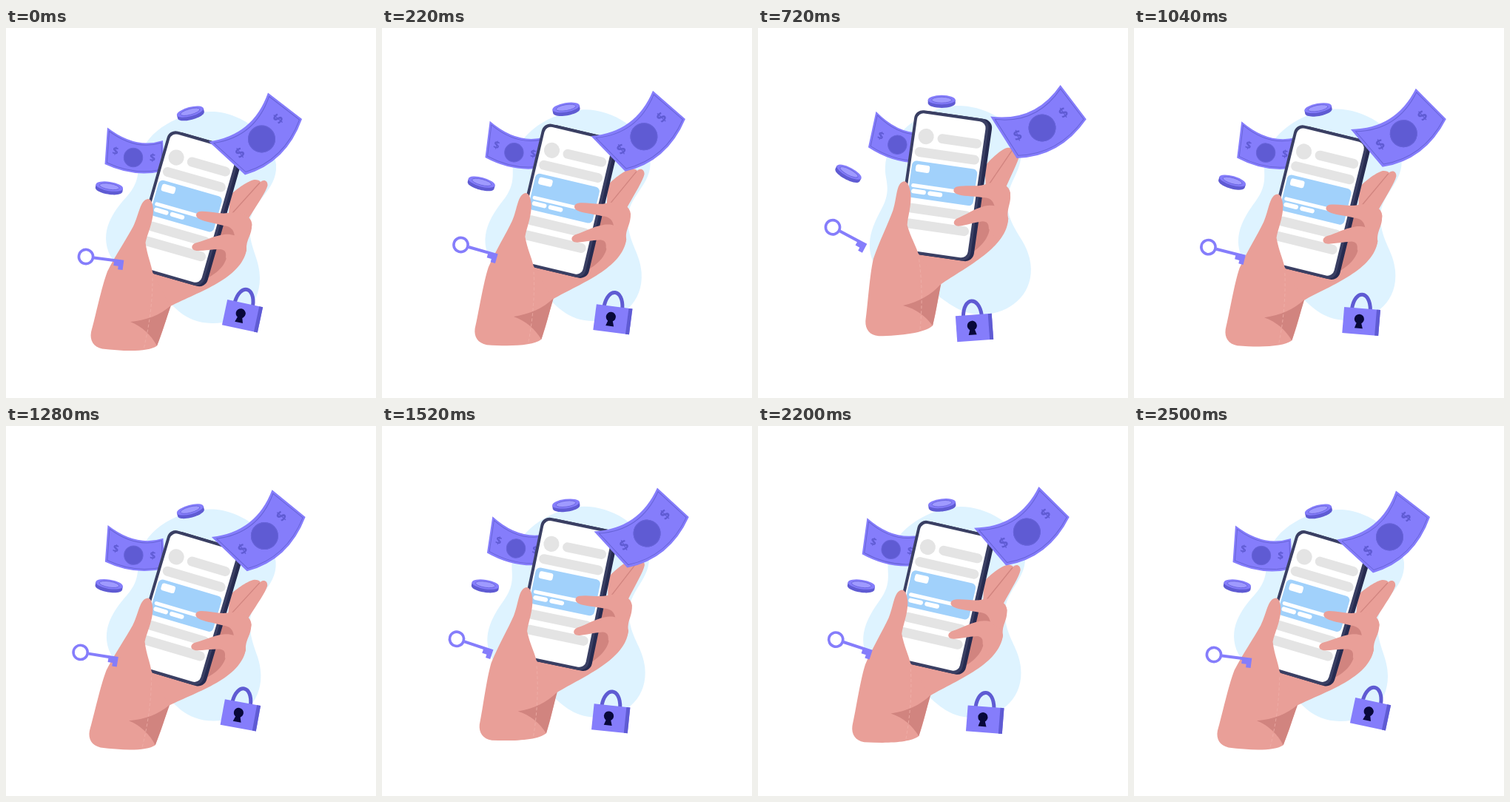
Recreate the animation shown at these times as an HTML page. Size 500 by 500 pixels, loop 2520 ms.

```html
<!DOCTYPE html>
<html lang="en">
<head>
<meta charset="utf-8">
<title>Mobile payment</title>
<style>
  html, body { margin: 0; width: 100%; height: 100%; overflow: hidden; background: #fff; }
  svg { display: block; width: 100%; height: 100%; }
  text { font: bold 19px "Open Sans", Arial, sans-serif; text-anchor: middle; fill: #5f5bd3; }
  .skin { fill: #e99f98; }
  .shade { fill: #d1847f; }
  .violet { fill: #857dfb; }
  .deep { fill: #5f5bd3; }
  .grey { fill: #e4e4e4; }
  .white { fill: #fff; }
  .line { fill: none; stroke: #6763d9; stroke-width: 1; }
</style>
</head>
<body>
<svg viewBox="0 0 500 500">
  <defs>
    <g id="disc">
      <path class="deep" d="M-18.5 -2V2.5C-18 11 18 11 18.5 2.5V-2Z"/>
      <ellipse class="violet" cy="-2" rx="18.5" ry="6.2"/>
      <ellipse cy="-1.8" rx="13.5" ry="4" fill="#9f9aff" stroke="#6a65de" stroke-width=".9"/>
    </g>
  </defs>

  <path id="blob" fill="#def3ff" d="M276 113C312 112 362 142 365 185C367 222 329 232 329 270C330 300 343 312 343 338C343 378 312 400 278 399C240 398 225 375 205 352C185 330 155 330 141 308C125 275 145 248 163 228C184 205 176 190 181 174C190 138 235 114 276 113Z"/>

  <g id="billLeft">
    <path class="violet" d="M137 134.500Q175 164 212 152L214 193Q174 203 133.500 184Z"/>
    <path class="line" d="M139.500 139.500Q175 166 210 155L211 191Q174 199.500 136.500 182Z"/>
    <circle class="deep" cx="172" cy="175" r="12.700"/>
    <circle class="line" cx="172" cy="175" r="12.700"/>
    <text transform="translate(148 166) rotate(12)" y="5" style="font-size:14px">$</text>
    <text transform="translate(198 175) rotate(4)" y="5" style="font-size:14px">$</text>
  </g>

  <g id="hand">
    <path class="skin" d="M300 262L303 226C312 217 328 206 336 205C340 205 343 206 344 208C348 204 354 206 353.500 213C351 222 341 236 328 257Z"/>
    <path d="M343 209L306 250" fill="none" stroke="#d1847f" stroke-width="1.300"/>
    <path class="skin" d="M188 300L180 390L222 376C262 356 318 338 325 300C324 285 333 280 332 265L318 251L285 250Z"/>
    <path class="shade" d="M278 296L299 298C301 315 290 330 268 340Z"/>
    <path class="shade" d="M286 262L304 266C309 272 310 277 310 283L283 286Z"/>

    <g transform="translate(220.900 136.400) rotate(16)">
      <rect x="6" width="100" height="194" rx="12" fill="#262b50"/>
      <rect width="101.500" height="194" rx="12" fill="#3a3f63"/>
      <rect class="white" x="4" y="4" width="93.500" height="186" rx="9"/>
      <circle class="grey" cx="19.400" cy="34.600" r="10.600"/>
      <g class="grey">
        <rect x="35" y="28" width="60" height="13" rx="6.500"/>
        <rect x="7" y="50" width="88" height="13" rx="6.500"/>
        <rect x="7" y="126.500" width="88" height="13" rx="6.500"/>
        <rect x="7" y="147.500" width="88" height="13" rx="6.500"/>
      </g>
      <rect x="6" y="69" width="89" height="50" rx="6" fill="#a1d1fb"/>
      <g class="white">
        <rect x="11.500" y="73.300" width="19" height="10" rx="3"/>
        <rect x="9" y="99.800" width="66" height="5" rx="2.500"/>
        <rect x="10" y="107" width="20" height="6" rx="3"/>
        <rect x="32.500" y="107" width="20" height="6" rx="3"/>
      </g>
    </g>

    <path class="skin" d="M258 290C270 287 280 281 295 279C310 277 324 286 325 300C322 312 315 320 305 326L297 310C298 303 296 300 290 299C278 299 268 301 259 301C249 301 249 292 258 290Z"/>
    <path class="skin" d="M262 248C275 247 288 252 300 250C315 247 332 252 332.500 266C331 277 326 284 320 290L309 282C308 272 303 268 294 267C280 263 268 262 261 258C255 255 256 249 262 248Z"/>
    <path class="skin" d="M192 231C197 231 199 240 199 248C198 265 191 278 188.500 290C191 308 196 318 198 330L222 376C216 395 212 410 204 429.500C192 438 160 437 130 433.500C118 431 113 422 115 411C121 390 129 350 137 329C148 307 163 285 172 268C180 252 181 232 192 231Z"/>
    <path class="shade" d="M168 397C190 395 208 388 223 375C216 395 211 411 204 429.500C196 415 185 404 168 397Z"/>
    <path d="M198 338Q198 385 186 434" fill="none" stroke="#efb0a9" stroke-width=".8" stroke-dasharray="4 3"/>
  </g>

  <g id="billRight">
    <path class="violet" d="M354 87.500L400 123Q379 182 323 198.500L274 153.500Q334 145 354 87.500Z"/>
    <path class="line" d="M355.500 92.500L396.500 124Q376 178.500 324 194.500L281 155.500Q337 147 355.500 92.500Z"/>
    <circle class="deep" cx="345.500" cy="150" r="18.500"/>
    <circle class="line" cx="345.500" cy="150" r="18"/>
    <text transform="translate(367.500 122.500) rotate(-50)" y="6.800">$</text>
    <text transform="translate(316 168.500) rotate(-35)" y="6.800">$</text>
  </g>

  <use id="coinTop" href="#disc"/>
  <use id="coinLeft" href="#disc"/>

  <g id="key">
    <circle r="9.600" fill="none" stroke="#857dfb" stroke-width="3.600"/>
    <path class="violet" d="M11 -2H51.500V11.500H45V7H38.500V2H11Z"/>
  </g>

  <g id="lock">
    <path d="M-14 -16C-12 -43 9 -43 11 -16" fill="none" stroke="#5f5bd3" stroke-width="5"/>
    <rect class="violet" x="-24.500" y="-17.500" width="49" height="35"/>
    <rect class="deep" x="19.500" y="-17.500" width="5" height="35"/>
    <path fill="#08083a" d="M-5.500 0L-8.500 9.500H2.500L-.5 0Z"/>
    <circle cx="-3" cy="-3" r="6.600" fill="#08083a"/>
  </g>
</svg>
<script>
const LOOP = 2520;

// Smooth curve through [time, value] points that never overshoots them.
function curve(points) {
  const rise = i => (points[i + 1][1] - points[i][1]) / (points[i + 1][0] - points[i][0]);
  const slopes = points.map((_, i) => {
    if (i === 0 || i === points.length - 1) return 0;
    const a = rise(i - 1), b = rise(i);
    return a * b > 0 ? 2 * a * b / (a + b) : 0;
  });
  return t => {
    let i = 0;
    while (i < points.length - 2 && t > points[i + 1][0]) i++;
    const [t0, v0] = points[i], [t1, v1] = points[i + 1];
    const d = t1 - t0, s = (t - t0) / d, r = 1 - s;
    return v0 * (1 + 2 * s) * r * r + v1 * s * s * (3 - 2 * s)
      + d * s * r * (slopes[i] * r - slopes[i + 1] * s);
  };
}

const keyX = curve([[0, 108], [440, 104], [720, 101], [1040, 100.5], [1520, 101], [1920, 103], [2180, 105], [2520, 108]]);

const spin = (angle, x, y) => `rotate(${angle} ${x} ${y})`;
const place = (x, y, angle) => `translate(${x} ${y}) rotate(${angle})`;

const parts = {
  blob: {
    swing: curve([[0, 0], [440, .71], [640, .97], [720, .94], [1040, .37], [1250, .04], [1520, .45], [1880, 1], [1920, 1], [2160, .52], [2500, 0], [LOOP, 0]]),
    pose: p => `translate(${2 * p} ${-3 * p}) ` + spin(-14 * p, 250, 230)
  },
  billLeft: {
    swing: curve([[0, 0], [440, .81], [660, .95], [720, .91], [1040, .34], [1240, 0], [1520, .5], [1870, 1], [1920, 1], [2160, .5], [2500, 0], [LOOP, 0]]),
    pose: p => `translate(${18 * p} ${-19 * p}) ` + spin(9 * p, 172, 175)
  },
  hand: {
    swing: curve([[0, 0], [440, .775], [670, .975], [720, .955], [1040, .27], [1240, -.09], [1520, .52], [1860, 1.01], [1920, 1], [2160, .48], [2440, -.09], [2500, -.065], [LOOP, 0]]),
    pose: p => spin(-8.2 * p, 21, 182)
  },
  billRight: {
    swing: curve([[0, 0], [440, .61], [540, .8], [720, 1], [770, 1.03], [1040, .49], [1290, .1], [1520, .325], [1620, .53], [1870, 1.03], [1920, .96], [2180, .5], [2500, 0], [LOOP, 0]]),
    pose: p => `translate(${38.5 * p} ${-15 * p}) ` + spin(15.2 * p, 345.5, 150)
  },
  coinTop: {
    swing: curve([[0, 0], [440, .71], [630, .88], [720, .84], [1040, .26], [1260, 0], [1520, .42], [1890, 1], [1920, 1], [2160, .52], [2500, 0], [LOOP, 0]]),
    pose: p => place(249.3 - 1.3 * p, 115 - 19 * p, -15 + 18 * p)
  },
  coinLeft: {
    swing: curve([[0, 0], [440, .74], [660, 1], [720, .98], [1040, .39], [1320, 0], [LOOP, 0]]),
    pose: p => place(139.5 - 17.7 * p, 216 - 20 * p, 9 + 19 * p)
  },
  key: {
    swing: curve([[0, 0], [440, .77], [630, .9], [720, .83], [1040, .27], [1260, .06], [1520, .44], [1890, 1], [1920, 1], [2160, .5], [2500, 0], [LOOP, 0]]),
    pose: (p, t) => place(keyX(t), 309 - 48 * p, 7.5 + 25 * p)
  },
  lock: {
    swing: curve([[0, 0], [440, .71], [690, 1], [720, 1], [1040, .46], [1280, .1], [1520, .38], [1890, 1], [1920, 1], [2160, .55], [2500, 0], [LOOP, 0]]),
    pose: p => place(319.5 - 27 * p, 389.3 + 15.7 * p, 12 - 16 * p)
  }
};

const start = performance.now();

function draw() {
  const t = (performance.now() - start) % LOOP;
  for (const [id, { swing, pose }] of Object.entries(parts)) {
    document.getElementById(id).setAttribute("transform", pose(swing(t), t));
  }
  requestAnimationFrame(draw);
}
draw();
</script>
</body>
</html>
```
